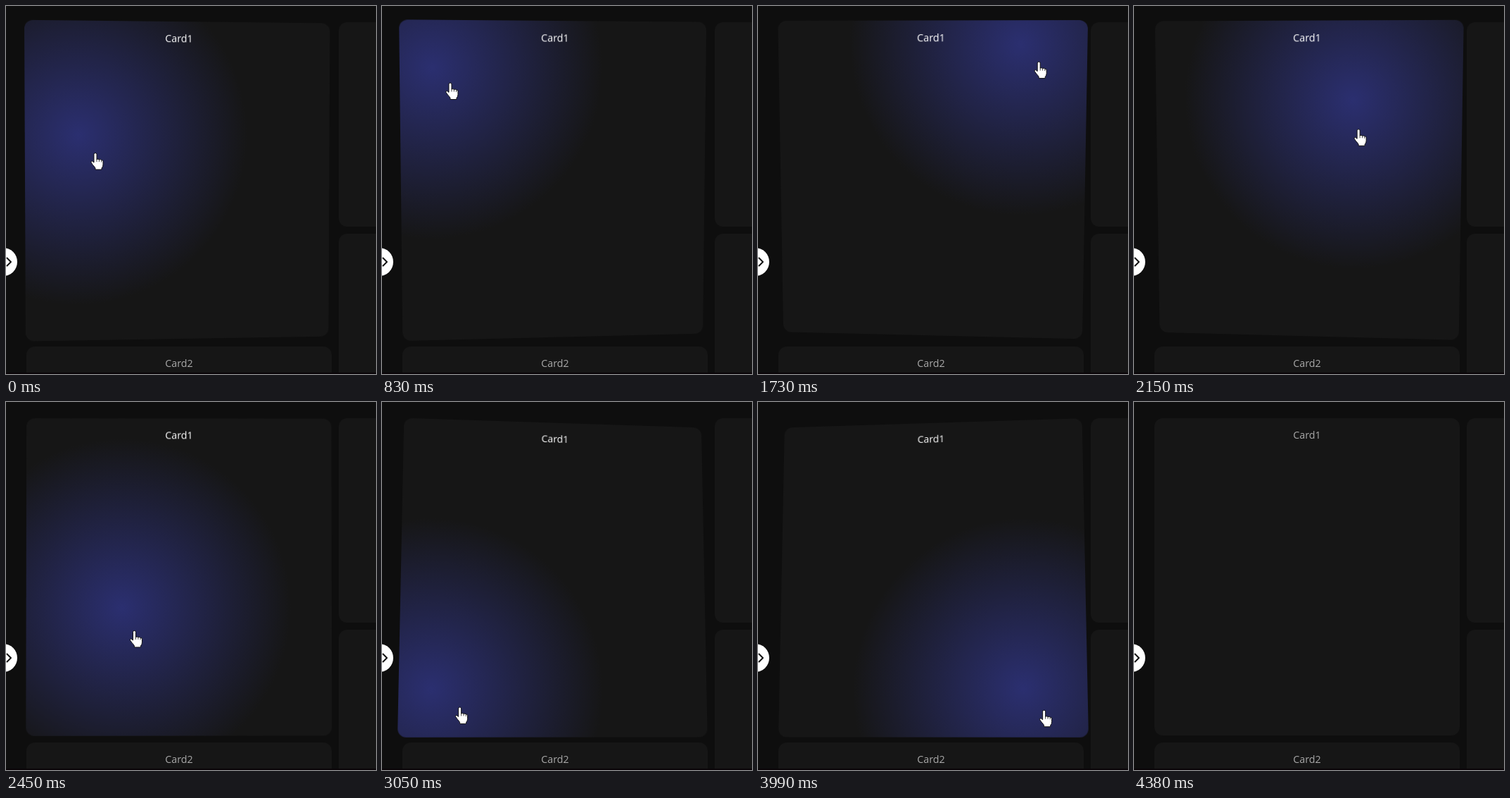
An HTML page for the animation above (4540 ms loop, 526 by 522 pixels).

```html
<!DOCTYPE html>
<html lang="en">
<head>
<meta charset="utf-8">
<title>Tilting card</title>
<style>
  html, body { margin: 0; width: 100%; height: 100%; overflow: hidden; background: #0e0e0e; }
  body { position: relative; }
  .card {
    position: absolute; width: 434px; height: 450px; border-radius: 12px; overflow: hidden;
    background: #161616; color: #a8a8a8; text-align: center;
    font: 14.3px/48px "Open Sans", "Noto Sans", sans-serif;
  }
  .strip { position: absolute; left: 0; top: 520px; width: 100%; height: 2px; background: #0a0508; }
  svg { position: absolute; left: 0; top: 0; }
</style>
</head>
<body>
<div class="card" style="left:473px;top:23px;height:290px"></div>
<div class="card" style="left:473px;top:323px"></div>
<div class="card" style="left:29px;top:483px">Card2</div>
<div class="card" id="card" style="left:29px;top:23px">Card1</div>
<div class="strip"></div>
<svg width="526" height="522">
  <circle cx="-4" cy="363" r="20" fill="#fff"/>
  <path d="M1 357l6 6-6 6" fill="none" stroke="#000" stroke-width="1.8"/>
  <g id="pointer" stroke="#111" stroke-linejoin="round">
    <path fill="#fff" d="M-2 1.5a2 2 0 0 1 4 0V8.5q2-1 3.4.4 2-.8 3.3.7 2.3-.4 2.3 1.9V16q0 3-2 5v2H0v-2q-1-2-3.5-4.5L-6 13q-.5-2.3 1.5-2L-2 13z"/>
    <path fill="none" stroke-width=".8" d="M2 8v4M5.4 9v3M8.6 10v2.5"/>
  </g>
</svg>
<script>
const LOOP = 4540, LEAVE = 4230, GONE = 4350;
const GLOW_LAG = 30, TILT_LAG = 130, DEGREES_PER_PX = .0435;
const CENTER = { x: 246, y: 248 };

// Turning points of the pointer's path: time (ms), x, y
const path = [
  [440, 127, 209], [780, 97, 115], [840, 97, 104], [1680, 394, 82], [1830, 420, 70], [1980, 392, 96],
  [2400, 188, 318], [2900, 96, 433], [3000, 97, 433], [3600, 370, 441], [3960, 398, 432], [LEAVE, 476, 483]
];

const card = document.getElementById("card");
const pointer = document.getElementById("pointer");

// The picture advances in a repeating rhythm: four steps of 150 ms, then six of 120 ms.
function snap(time) {
  const phase = (time + 810) % 1320;
  const held = phase < 600 ? phase % 150 : (phase - 600) % 120;
  return time - held;
}

function pointerAt(time) {
  const next = path.findIndex(key => key[0] > time);
  const [t0, x0, y0] = path.at(next < 0 ? -1 : Math.max(next - 1, 0));
  const [t1, x1, y1] = path.at(next);
  const k = t1 > t0 ? Math.max(0, (time - t0) / (t1 - t0)) : 0;
  return { x: x0 + (x1 - x0) * k, y: y0 + (y1 - y0) * k };
}

function draw(elapsed) {
  const time = snap(elapsed % LOOP);
  const hand = pointerAt(time);
  const glow = pointerAt(time - GLOW_LAG);
  const pull = pointerAt(time - TILT_LAG);
  const hovered = time < LEAVE, present = time < GONE;

  // After leaving, the card settles back flat.
  const settle = Math.min(1, Math.max(0, (GONE - time) / 240));
  const tiltX = (pull.y - CENTER.y) * DEGREES_PER_PX * settle;
  const tiltY = (CENTER.x - pull.x) * DEGREES_PER_PX * settle;

  card.style.transform = settle ? `perspective(1500px) rotateX(${tiltX}deg) rotateY(${tiltY}deg)` : "none";
  card.style.backgroundImage = hovered
    ? `radial-gradient(circle 240px at ${glow.x - 52}px ${glow.y - 49}px, #2b2f70, #161616)` : "none";
  card.style.color = hovered ? "#fff" : present ? "#d0d0d0" : "#a8a8a8";
  pointer.setAttribute("transform", `translate(${hand.x} ${hand.y})`);
  pointer.style.display = present ? "" : "none";
}

const start = performance.now();
function tick() {
  draw(performance.now() - start);
  requestAnimationFrame(tick);
}
tick();
</script>
</body>
</html>
```
